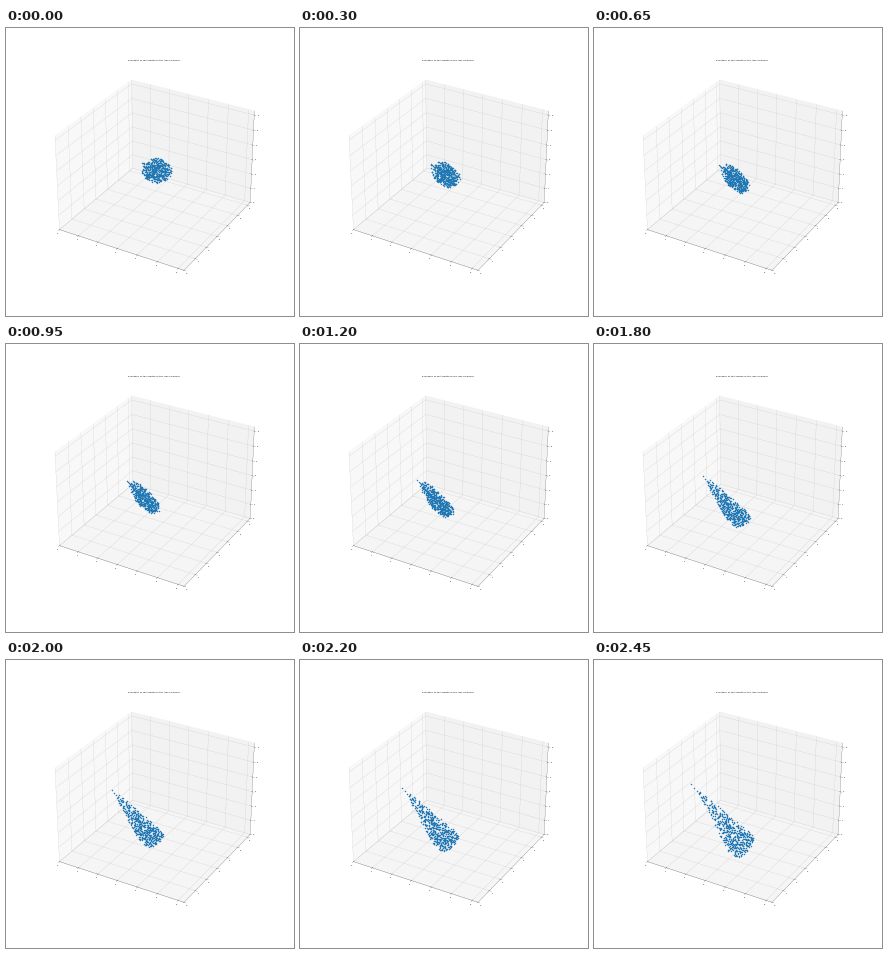
Recreate the animation shown at these times as a matplotlib script. Size 288 by 288 pixels, loop 2.5 s.

```python
import numpy as np
import matplotlib.pyplot as plt
from matplotlib.animation import FuncAnimation

A, B, C = np.sqrt(3), np.sqrt(2), 1.0
FRAMES, INTERVAL = 50, 50
DT = 0.025
COUNT, RADIUS = 500, 0.67


def flow(p):
    x, y, z = p
    return np.array([
        A * np.sin(z) + C * np.cos(y),
        B * np.sin(x) + A * np.cos(z),
        C * np.sin(y) + B * np.cos(x),
    ])


def rk4(p, h):
    k1 = flow(p)
    k2 = flow(p + h / 2 * k1)
    k3 = flow(p + h / 2 * k2)
    k4 = flow(p + h * k3)
    return p + h / 6 * (k1 + 2 * k2 + 2 * k3 + k4)


def start_points():
    """Uniform ball around the centre, plus a few outliers that lead the tail."""
    rng = np.random.default_rng(4)
    heading = rng.normal(size=(3, COUNT))
    heading /= np.linalg.norm(heading, axis=0)
    ball = RADIUS * np.cbrt(rng.random(COUNT)) * heading
    lead = np.outer([-0.64, -0.16, 0.39], [1.0, 0.94, 0.89, 0.85])
    return np.pi + np.hstack([ball, lead])


path = [start_points()]
for _ in range(FRAMES - 1):
    path.append(rk4(path[-1], DT))

fig = plt.figure(figsize=(20, 20), dpi=14.4)
ax = fig.add_subplot(projection="3d")
ax.set(xlim=(0, 2 * np.pi), ylim=(0, 2 * np.pi), zlim=(0, 2 * np.pi))
ax.set_title("Evolution of test points in the ABC flowfield")
dots, = ax.plot(*path[0], "o", color="tab:blue")


def update(i):
    dots.set_data_3d(*path[i])
    return dots,


anim = FuncAnimation(fig, update, frames=FRAMES, interval=INTERVAL,
                     repeat=True, repeat_delay=0)
plt.show()
```
